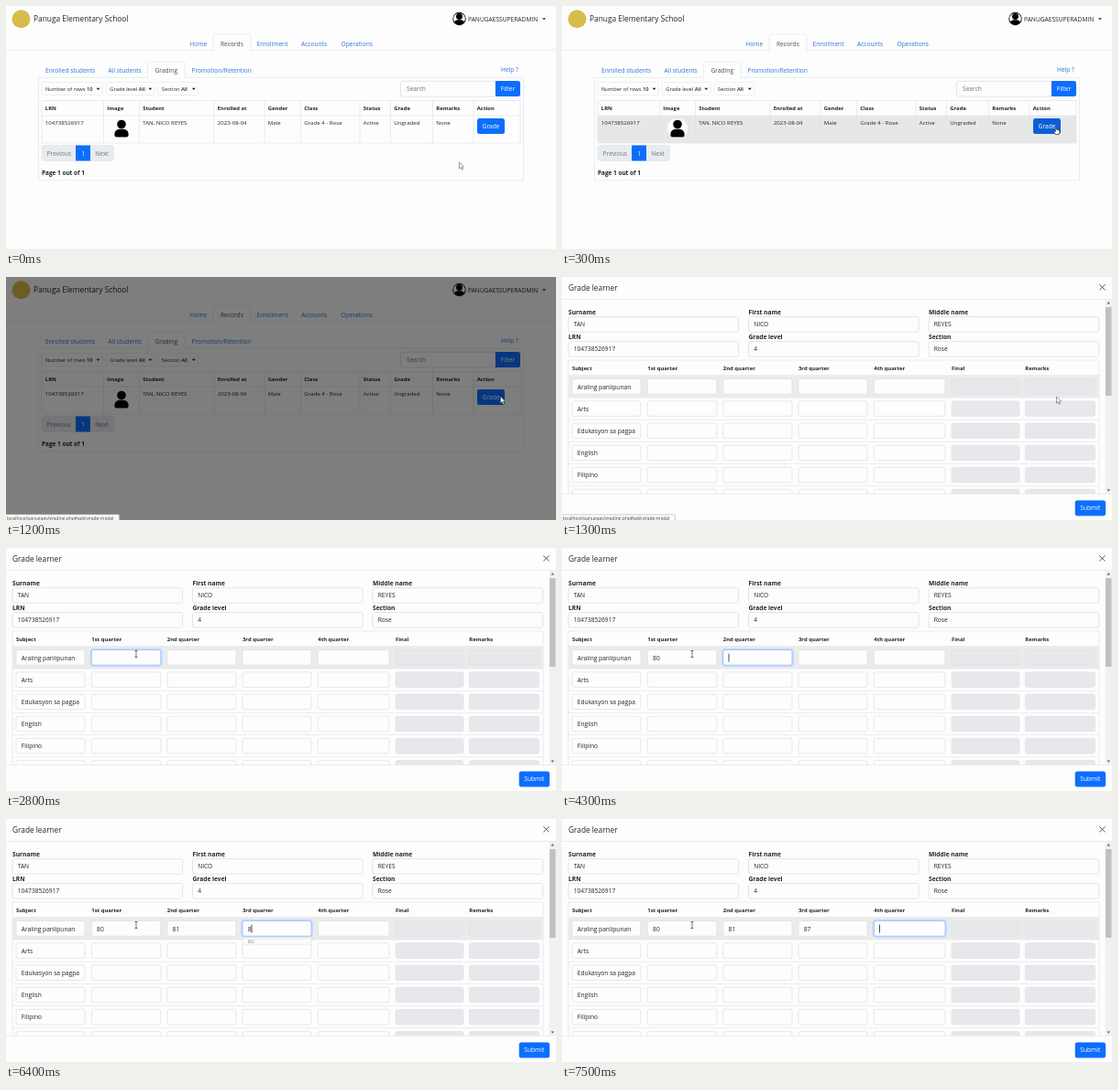
An HTML page with a canvas for the animation above (8000 ms loop, 600x266 px).

```html
<!DOCTYPE html>
<html lang="en">
<head>
<meta charset="utf-8">
<title>Grading form</title>
<style>
html, body { margin: 0; width: 100%; height: 100%; overflow: hidden; background: #fdfdfd; }
canvas { display: block; width: 600px; height: 266px; }
</style>
</head>
<body>
<canvas id="stage"></canvas>
<script>
const W = 600, H = 266, LOOP = 8000, STEP = 100;
const canvas = document.getElementById('stage');
const c = canvas.getContext('2d');
const scale = window.devicePixelRatio || 1;
canvas.width = W * scale;
canvas.height = H * scale;

const PAPER = '#fdfdfd', INK = '#212529', BLUE = '#0d6efd', LINK = '#2c75d8';
const LINE = '#dee2e6', MUTED = '#6c757d';
const BODY = 6.65, CELL = 6.1, HEAD = 5.9, SMALL = 5.75;
const person = { last: 'TAN', first: 'NICO', middle: 'REYES', lrn: '104738526917' };

function text(s, x, y, size = BODY, color = INK, weight = 400, align = 'left') {
  c.font = `${weight} ${size}px "Open Sans", "Noto Sans", sans-serif`;
  c.fillStyle = color;
  c.textAlign = align;
  c.fillText(s, x, y);
  return c.measureText(s).width;
}

function fill(x, y, w, h, color) {
  c.fillStyle = color;
  c.fillRect(x, y, w, h);
}

function box(x, y, w, h, r, bg, border, lw = 0.6) {
  c.beginPath();
  c.roundRect(x, y, w, h, r);
  if (bg) { c.fillStyle = bg; c.fill(); }
  if (border) { c.strokeStyle = border; c.lineWidth = lw; c.stroke(); }
}

function disc(x, y, r, color) {
  c.beginPath();
  c.arc(x, y, r, 0, Math.PI * 2);
  c.fillStyle = color;
  c.fill();
}

function poly(points, bg, border, lw = 0.6) {
  c.beginPath();
  points.forEach(([x, y]) => c.lineTo(x, y));
  c.closePath();
  c.fillStyle = bg;
  c.fill();
  if (border) { c.strokeStyle = border; c.lineWidth = lw; c.stroke(); }
}

const hline = (x1, x2, y, color = LINE) => fill(x1, y - 0.3, x2 - x1, 0.6, color);
const vline = (x, y1, y2, color = LINE) => fill(x - 0.3, y1, 0.6, y2 - y1, color);
const caretDown = (x, y) => poly([[x - 2, y - 1], [x + 2, y - 1], [x, y + 1.1]], INK);

function figure(x, y, s) {
  disc(x, y - 4.2 * s, 4.8 * s, '#000');
  c.beginPath();
  c.roundRect(x - 7.6 * s, y + 1 * s, 15.2 * s, 8.8 * s, [5.5 * s, 5.5 * s, 2.5 * s, 2.5 * s]);
  c.fill();
}

function tab(x1, x2, y1, y2) {
  box(x1, y1, x2 - x1, y2 - y1 + 1, [2, 2, 0, 0], PAPER, LINE);
  fill(x1 + 0.3, y2 - 0.5, x2 - x1 - 0.6, 2, PAPER);
}

function dropdown(x, w, label, value) {
  box(x, 83.5, w, 14, 2, PAPER, '#e4e6e9');
  const used = text(label + ' ', x + 4, 92.8, SMALL);
  text(value, x + 4 + used, 92.8, SMALL, INK, 600);
  caretDown(x + w - 5, 90.8);
}

// Pointer shapes
function arrow(x, y) {
  const shape = [[0, 0], [0, 7], [1.6, 5.5], [2.8, 8.2], [4, 7.7], [2.9, 5.1], [5, 5]];
  poly(shape.map(([a, b]) => [x + a, y + b]), '#fff', '#555', 0.6);
}

function hand(x, y) {
  const shape = [[-0.7, 0], [0.6, 0], [0.7, 3], [3.8, 3.7], [4, 6], [3, 8.4],
    [-0.6, 8.4], [-2.8, 5.2], [-2, 4.5], [-0.7, 5.5]];
  poly(shape.map(([a, b]) => [x + a, y + b]), '#fff', '#222', 0.7);
}

function beam(x, y) {
  vline(x, y - 3.7, y + 3.7, '#222');
  hline(x - 1.5, x + 1.5, y - 3.7, '#222');
  hline(x - 1.5, x + 1.5, y + 3.7, '#222');
}

const ease = p => p * p * (3 - 2 * p);
const clamp = v => Math.max(0, Math.min(1, v));
const mix = (a, b, p) => a + (b - a) * p;

function statusBar(alpha) {
  if (alpha <= 0) return;
  c.globalAlpha = alpha;
  box(-1, 260, 124.5, 8, [0, 1, 0, 0], '#f8f9fa', '#b5b8bb');
  text('localhost/panugaes/grading.php#add-grade-modal', 1, 266, 4.9, '#444');
  c.globalAlpha = 1;
}

// Student list
const columns = [
  [39, 'LRN', person.lrn], [106.5, 'Image', ''],
  [145.5, 'Student', `${person.last}, ${person.first} ${person.middle}`],
  [227, 'Enrolled at', '2023-08-04'], [282, 'Gender', 'Male'],
  [321.5, 'Class', 'Grade 4 - Rose'], [386, 'Status', 'Active'],
  [419.5, 'Grade', 'Ungraded'], [465.5, 'Remarks', 'None'], [510, 'Action', '']
];

function drawList(rowHover, buttonHover) {
  disc(16.5, 14.2, 10, '#d6bd4b');
  text('Panuga Elementary School', 30, 17.2, 8.35);
  disc(494.5, 14, 7.2, '#000');
  disc(494.5, 14, 6.3, '#fff');
  c.save();
  c.beginPath();
  c.arc(494.5, 14, 6.6, 0, Math.PI * 2);
  c.clip();
  figure(494.5, 14.5, 0.72);
  c.restore();
  text('PANUGAESSUPERADMIN', 504, 16.6);
  caretDown(587, 14.2);

  hline(0, W, 48);
  tab(226, 267, 31, 48);
  [[200.3, 'Home'], [234, 'Records'], [273.5, 'Enrollment'], [322, 'Accounts'], [365.5, 'Operations']]
    .forEach(([x, s]) => text(s, x, 43.6, BODY, s === 'Records' ? '#495057' : LINK));

  box(35.5, 78.3, 529, 112.7, 0, null, LINE);
  tab(154.5, 195, 60.8, 78.3);
  [[43, 'Enrolled students'], [111.5, 'All students'], [162.5, 'Grading'], [202.5, 'Promotion/Retention']]
    .forEach(([x, s]) => text(s, x, 72.7, BODY, s === 'Grading' ? '#495057' : LINK));
  text('Help ?', 540, 72.3, BODY, LINK);

  dropdown(39, 66.5, 'Number of rows', '10');
  dropdown(109.3, 53, 'Grade level', 'All');
  dropdown(165.8, 44, 'Section', 'All');
  box(430.5, 82.3, 103.5, 16.8, [2.5, 0, 0, 2.5], PAPER, '#ced4da');
  text('Search', 437, 93.2, BODY, MUTED);
  box(534, 82, 27, 17, [0, 2.5, 2.5, 0], BLUE);
  text('Filter', 547.5, 93.2, BODY, '#fff', 400, 'center');

  if (rowHover) fill(39, 120, 522, 30, '#e7e7e7');
  [103.5, 120, 150].forEach(y => hline(39, 561, y));
  columns.forEach(([x, head, value]) => {
    vline(x, 103.5, 150);
    text(head, x + 3.8, 113.6, HEAD, INK, 700);
    text(value, x + 3.8, 130.2, CELL);
  });
  vline(561, 103.5, 150);
  disc(126, 134, 11, PAPER);
  figure(126, 133.7, 1);
  box(514, 123, 30, 17, 2.5, buttonHover ? '#0b5ed7' : BLUE);
  text('Grade', 529, 134.4, BODY, '#fff', 400, 'center');

  box(39, 152.6, 78.5, 16.8, 2.5, '#e9ecef', LINE);
  fill(76, 152.5, 16, 17, BLUE);
  text('Previous', 57.8, 163.6, BODY, MUTED, 400, 'center');
  text('1', 84.2, 163.6, BODY, '#fff', 400, 'center');
  text('Next', 104.5, 163.6, BODY, MUTED, 400, 'center');
  text('Page 1 out of 1', 39, 184.6, 6.45, INK, 700);
}

// Grading form
const ROW = 24.2;
const inputs = [[11, 75], [93.3, 75.5], [175.8, 75.2], [258, 75], [340.3, 77.7], [425, 74], [505.3, 76.2]];
const heads = ['Subject', '1st quarter', '2nd quarter', '3rd quarter', '4th quarter', 'Final', 'Remarks'];
const subjects = ['Araling panlipunan', 'Arts', 'Edukasyon sa pagpa', 'English', 'Filipino', ''];
const details = [
  [7, 'Surname', person.last, 'LRN', person.lrn],
  [203.5, 'First name', person.first, 'Grade level', '4'],
  [400, 'Middle name', person.middle, 'Section', 'Rose']
];

// Per quarter: focus time, keys with their times, suggestion start and end, caret-off spans
const quarters = [
  { from: 2300, to: 4300, keys: [[3300, '8'], [3900, '0']], pop: [3400, 4300], off: [2800, 3300] },
  { from: 4300, to: 5600, keys: [[4700, '8'], [5200, '1']], pop: [4800, 5300] },
  { from: 5600, to: 7500, keys: [[6300, '8'], [6600, '7']], pop: [6400, 6700], off: [6100, 6300, 7200, 7500] },
  { from: 7500, to: LOOP, keys: [] }
];

function caretOn(q, t) {
  const off = q.off || [];
  for (let i = 0; i < off.length; i += 2) if (t >= off[i] && t < off[i + 1]) return false;
  return true;
}

function quarter(q, i, t) {
  const [x, w] = inputs[i + 1], y = 111.6, h = 16.6;
  const focused = t >= q.from && t < q.to;
  if (focused) {
    box(x - 0.9, y - 0.9, w + 1.8, h + 1.8, 3, null, '#c2dbfe', 1.8);
    box(x, y, w, h, 2.2, PAPER, '#86b7fe', 0.7);
  }
  const value = q.keys.filter(k => t >= k[0]).map(k => k[1]).join('');
  const width = text(value, x + 5.8, 122.6);
  if (focused && caretOn(q, t)) fill(x + 5.8 + width, 115.6, 0.8, 9, '#222');
}

function suggestion(q, i, t) {
  if (!q.pop || t < q.pop[0] || t >= q.pop[1]) return;
  const [x, w] = inputs[i + 1];
  c.globalAlpha = t < q.pop[0] + STEP ? 0.5 : 1;
  box(x, 129, w, 8.6, 1, PAPER, '#c4c7ca');
  text('80', x + 5.8, 135.5, HEAD);
  c.globalAlpha = 1;
}

function drawForm(t) {
  text('Grade learner', 7, 15.3, 8.3);
  c.strokeStyle = '#555';
  c.lineWidth = 1;
  c.beginPath();
  c.moveTo(586.3, 8.2); c.lineTo(592.5, 14.4);
  c.moveTo(592.5, 8.2); c.lineTo(586.3, 14.4);
  c.stroke();
  hline(0, W, 24.3);

  details.forEach(([x, ...pairs]) => [0, 1].forEach(k => {
    const y = 43.6 + k * 27;
    text(pairs[k * 2], x, y - 2.5, BODY, INK, 700);
    box(x, y, 185.7, 16.5, 2.2, PAPER, '#ced4da');
    text(pairs[k * 2 + 1], x + 5.7, y + 10.8);
  }));

  c.save();
  c.beginPath();
  c.rect(0, 88, 592, 149);
  c.clip();
  hline(7, 586, 91);
  hline(7, 586, 107.6);
  vline(7, 91, 237);
  vline(586, 91, 237);
  heads.forEach((s, i) => text(s, inputs[i][0], 101.7, HEAD, INK, 700));
  fill(7, 108, 579, 24, '#ebebeb');
  subjects.forEach((name, r) => {
    const y = 111.6 + r * ROW;
    hline(7, 586, 132 + r * ROW);
    inputs.forEach(([x, w], i) => {
      const locked = i > 4;
      box(x, y, w, 16.6, 2.2, locked ? '#e6e8eb' : PAPER, locked ? '#dcdfe3' : '#d3d8dd');
    });
    text(name, 16.8, y + 11);
  });
  quarters.forEach((q, i) => quarter(q, i, t));
  quarters.forEach((q, i) => suggestion(q, i, t));
  c.restore();

  fill(592.5, 24.6, 7.5, 212.4, '#f1f1f1');
  fill(593, 33, 6.5, 97, '#c1c1c1');
  poly([[594.4, 29.4], [598, 29.4], [596.2, 27]], '#666');
  poly([[594.4, 232.4], [598, 232.4], [596.2, 234.8]], '#666');
  hline(0, W, 237.3);
  box(559.7, 244.4, 33.3, 17, 2.5, BLUE);
  text('Submit', 576.3, 255.4, BODY, '#fff', 400, 'center');
}

function listScene(t) {
  const p = ease(clamp(t / 300));
  const dimmed = t >= 1200;
  const x = mix(494.5, 539, p), y = mix(171, 132.2, p);
  const onRow = y < 150 && !dimmed;
  const onButton = onRow && x > 514 && y < 140;
  drawList(onRow, onButton);
  if (dimmed) fill(0, 0, W, H, 'rgba(0,0,0,0.5)');
  statusBar(clamp((t - 400) / 300));
  if (dimmed) arrow(539.5, 131);
  else if (onButton) hand(x, y);
  else arrow(x, y);
}

function formScene(t) {
  const p = ease(clamp((t - 1400) / 600));
  const x = mix(539.5, 142, p), y = mix(131, 116, p);
  drawForm(t);
  statusBar(1 - clamp((t - 1400) / 300));
  const overText = y < 128.2 && inputs.slice(0, 5).some(([a, w]) => x > a && x < a + w);
  if (overText) beam(x, y);
  else arrow(x, y);
}

function draw(now) {
  const t = Math.floor((now % LOOP) / STEP) * STEP;
  c.setTransform(scale, 0, 0, scale, 0, 0);
  fill(0, 0, W, H, PAPER);
  if (t < 1300) listScene(t);
  else formScene(t);
}

const start = performance.now();
function loop() {
  draw(performance.now() - start);
  requestAnimationFrame(loop);
}
loop();
</script>
</body>
</html>
```
